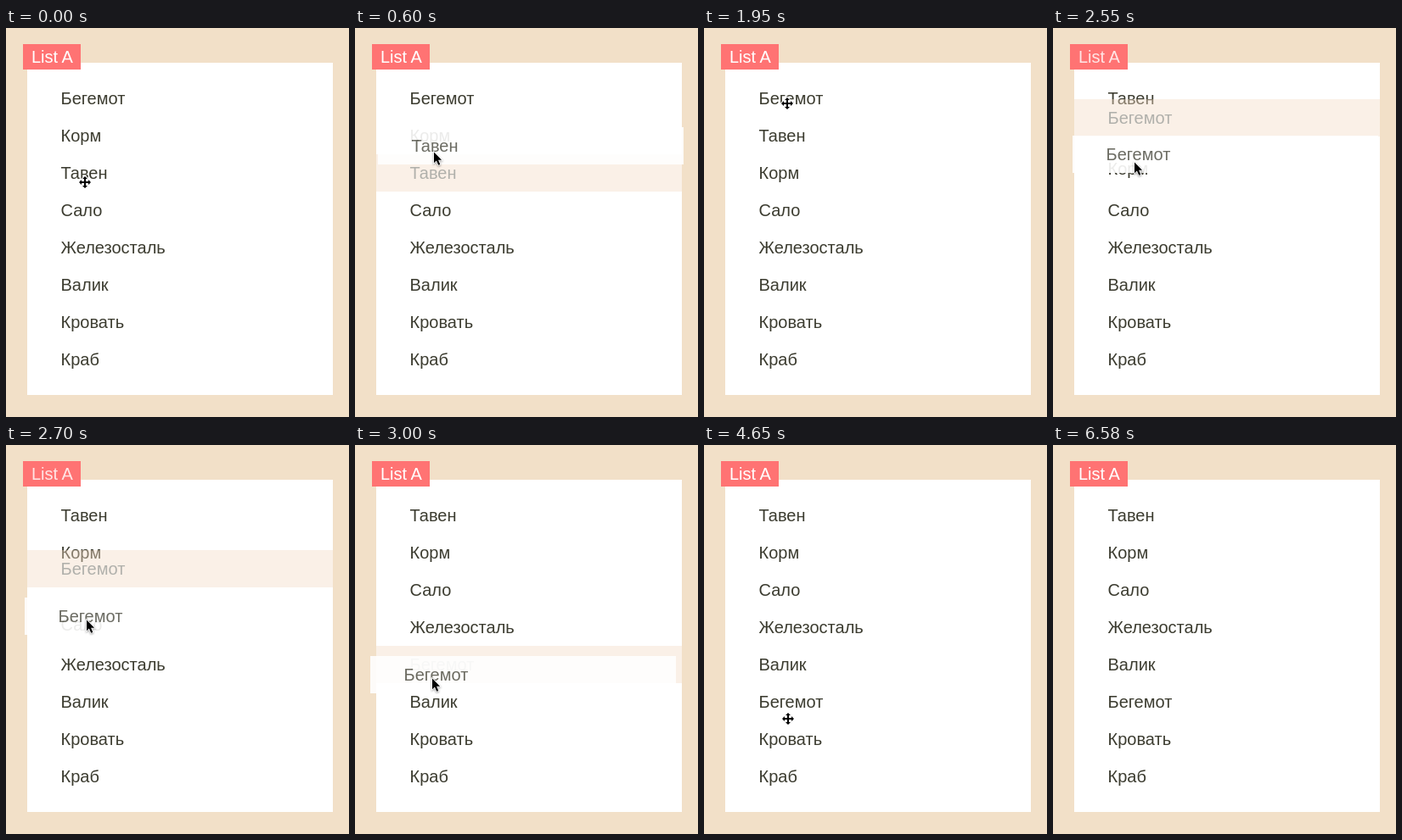
Animation of 404x459 px, one loop 7180 ms. Source, as an HTML page:

```html
<!DOCTYPE html>
<html lang="ru">
<head>
<meta charset="utf-8">
<style>
  html, body { margin: 0; width: 100%; height: 100%; overflow: hidden; }
  body { position: relative; background: #f2e0c8; font: 20px "Liberation Sans", Arial, sans-serif; }
  #list, #title, .item, svg { position: absolute; }
  #list { left: 25px; top: 41px; width: 360px; height: 392px; background: #fff; }
  #title { left: 20px; top: 19px; width: 58px; padding-left: 10px; line-height: 30px;
           background: #ff7373; color: #fff; }
  .item { box-sizing: border-box; left: 25px; width: 360px; height: 44px; padding-left: 39.5px;
          line-height: 44px; color: #3c3c30; white-space: nowrap; }
  .ghost { background: #f5dcc5; opacity: .4; z-index: 1; }
  #drag { background: #fff; color: #5c5c52; opacity: .9; z-index: 2; }
  svg { left: 0; top: 0; z-index: 3; overflow: visible; }
  path { stroke: #fff; stroke-width: 2; paint-order: stroke; }
  #arrow { filter: drop-shadow(0 1px 1px #0006); stroke-width: 1.6; }
</style>
</head>
<body>
<div id="list"></div>
<div id="title"><span>List A</span></div>
<div id="drag" class="item"></div>
<svg width="1" height="1">
  <path id="arrow" d="M0-.5V12.2L2.9 9.5 5.2 14.8 7.3 13.9 5.1 8.8H9.1Z"/>
  <path id="move" d="M0-7L3-4H1V-1H4V-3L7 0 4 3V1H1V4H3L0 7-3 4H-1V1H-4V3L-7 0-4-3V-1H-1V-4H-3Z"/>
</svg>
<script>
const LOOP = 7180, ROW = 44, TOP = 61;
const names = ['Бегемот', 'Корм', 'Тавен', 'Сало', 'Железосталь', 'Валик', 'Кровать', 'Краб'];
const grab = { 0: [73, 27], 2: [66, 30] };   // pointer offset inside the held row

// cursor, order and held row carry over; shift (rows still sliding) and lag do not
const steps = [
  { t: 0, cursor: 'move', x: 93, y: 182, order: '01234567', held: null },
  { t: 300, cursor: 'arrow', x: 91, y: 179 },
  { t: 450, x: 91, y: 161, held: 2 },
  { t: 600, x: 93, y: 147 },
  { t: 750, x: 93, y: 138, order: '02134567', shift: { 1: 116, 2: 138 } },
  { t: 900, x: 93, y: 131 },
  { t: 1050, x: 93, y: 125 },
  { t: 1500, held: null },
  { t: 1650, cursor: 'move', x: 94, y: 127 },
  { t: 1800, x: 97, y: 90 },
  { t: 1950, x: 98, y: 89 },
  { t: 2400, cursor: 'arrow', x: 97, y: 120, held: 0 },
  { t: 2550, x: 96, y: 159, lag: 5, order: '21034567', shift: { 0: 84, 1: 144 } },
  { t: 2700, x: 95, y: 207, order: '21304567', shift: { 0: 124, 3: 190 } },
  { t: 2850, x: 91, y: 247, order: '21340567', shift: { 0: 185, 4: 230 } },
  { t: 3000, x: 91, y: 276 },
  { t: 3150, x: 92, y: 296, order: '21345067', shift: { 0: 250, 5: 268 } },
  { t: 3300, x: 95, y: 308 },
  { t: 3450, x: 97, y: 319 },
  { t: 3600, x: 98, y: 322 },
  { t: 3750, held: null },
  { t: 4650, cursor: 'move', x: 99, y: 323 },
  { t: 6290, x: 171, y: 392 },
  { t: 6440, cursor: 'arrow', x: 232, y: 441 },
  { t: 6580, cursor: '' }
];

const $ = id => document.getElementById(id);
const label = document.querySelector('#title span');
const items = names.map(name => {
  const el = document.createElement('div');
  el.className = 'item';
  el.textContent = name;
  document.body.append(el);
  return el;
});

function stateAt(t) {
  let state = {};
  for (const step of steps)
    if (step.t <= t) state = { ...state, shift: null, lag: 0, ...step };
  return state;
}

function draw({ cursor, x, y, order, held, shift, lag }) {
  items.forEach((el, i) => {
    el.style.top = (shift?.[i] ?? TOP + ROW * order.indexOf(i)) + 'px';
    el.classList.toggle('ghost', i === held);
  });
  // text smoothing thins while rows slide
  label.style.opacity = shift ? .82 : 1;

  const drag = $('drag');
  drag.hidden = held === null;
  if (held !== null) {
    drag.textContent = names[held];
    drag.style.left = x - grab[held][0] + 'px';
    drag.style.top = y - grab[held][1] - lag + 'px';
  }
  for (const kind of ['arrow', 'move']) {
    $(kind).style.display = kind === cursor ? '' : 'none';
    $(kind).setAttribute('transform', `translate(${x} ${y})`);
  }
}

const start = performance.now();
function tick() {
  draw(stateAt((performance.now() - start) % LOOP));
  requestAnimationFrame(tick);
}
tick();
</script>
</body>
</html>
```
